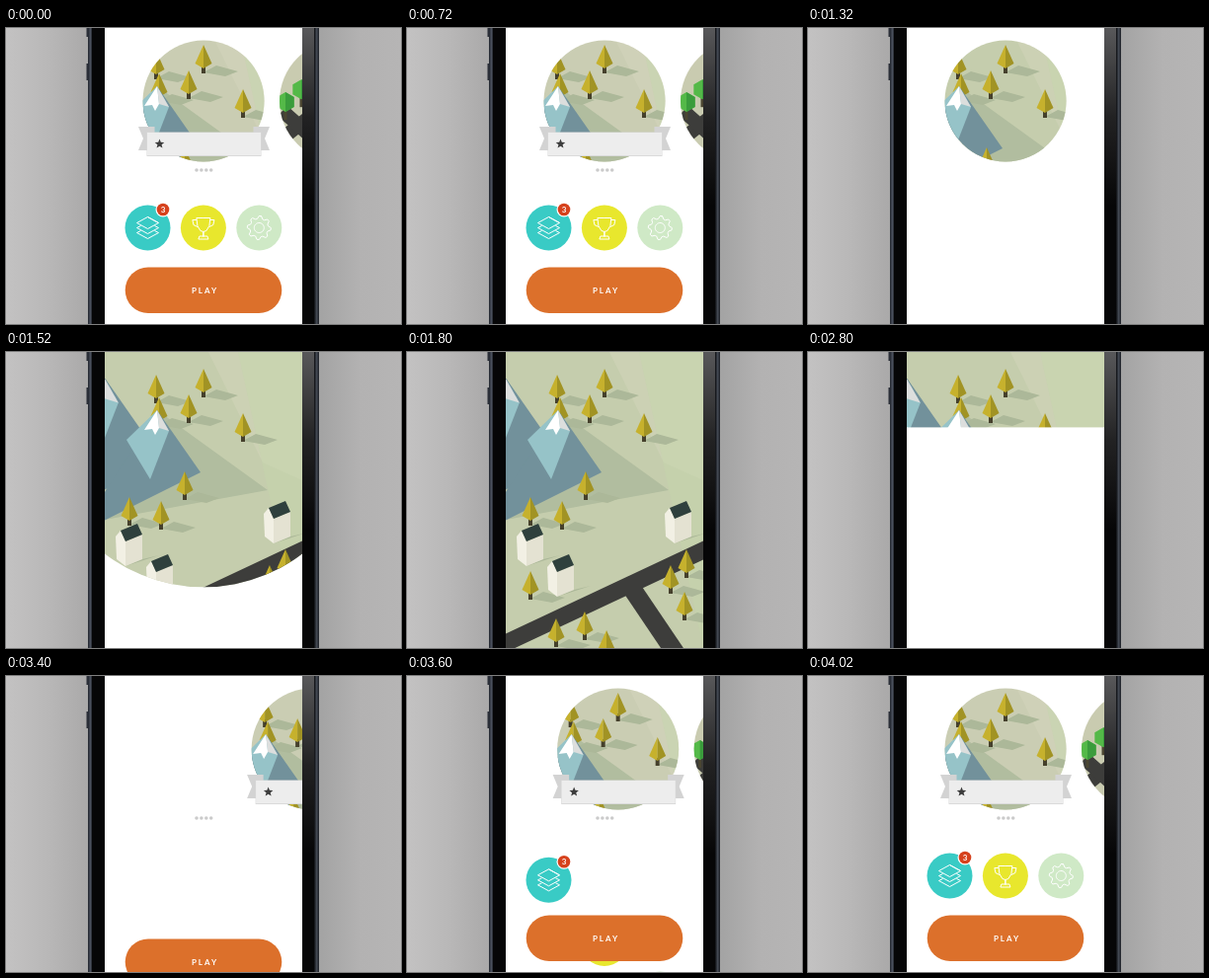
An HTML page with a canvas for the animation above (4240 ms loop, 400 by 300 pixels).

```html
<!DOCTYPE html>
<html lang="en">
<head>
<meta charset="utf-8">
<title>Map menu</title>
<style>
html, body { margin: 0; width: 100%; height: 100%; overflow: hidden; background: #b4b4b4; }
canvas { display: block; width: 400px; height: 300px; }
</style>
</head>
<body>
<canvas id="stage"></canvas>
<script>
const LOOP = 4240;
const canvas = document.getElementById('stage');
const ratio = window.devicePixelRatio || 1;
canvas.width = 400 * ratio;
canvas.height = 300 * ratio;
const c = canvas.getContext('2d');
c.scale(ratio, ratio);

const progress = (t, start, length) => Math.min(1, Math.max(0, (t - start) / length));
const outCubic = u => 1 - (1 - u) ** 3;
const outQuad = u => 1 - (1 - u) ** 2;
const inOutSine = u => (1 - Math.cos(Math.PI * u)) / 2;

function rect(color, x, y, w, h) {
  c.fillStyle = color;
  c.fillRect(x, y, w, h);
}

function poly(color, ...points) {
  c.beginPath();
  points.forEach(p => c.lineTo(...p));
  c.fillStyle = color;
  c.fill();
}

function line(...points) {
  c.beginPath();
  points.forEach(p => c.lineTo(...p));
  c.stroke();
}

function outline(points) {
  line(...points, points[0], points[1]);
}

// Points around the centre; radius(i) gives the shape.
function ring(count, radius, turn = -Math.PI / 2) {
  return Array.from({ length: count }, (_, i) => {
    const a = i * 2 * Math.PI / count + turn;
    return [radius(i) * Math.cos(a), radius(i) * Math.sin(a)];
  });
}

function disc(color, x, y, r) {
  c.beginPath();
  c.arc(x, y, r, 0, 7);
  c.fillStyle = color;
  c.fill();
}

function at(x, y, draw, sx = 1, sy = sx) {
  c.save();
  c.translate(x, y);
  c.scale(sx, sy);
  draw();
  c.restore();
}

function bothSides(draw) {
  draw();
  at(0, 0, draw, -1, 1);
}

function inCircle(x, y, r, draw) {
  c.save();
  c.beginPath();
  c.arc(x, y, r, 0, 7);
  c.clip();
  draw();
  c.restore();
}

function label(text, x, y) {
  c.fillStyle = '#fff';
  c.font = 'bold 8px Lato, sans-serif';
  c.textAlign = 'center';
  c.fillText(text, x, y);
}

function gradient(x0, y0, x1, y1, ...colors) {
  const g = c.createLinearGradient(x0, y0, x1, y1);
  colors.forEach((color, i) => g.addColorStop(i / (colors.length - 1), color));
  return g;
}

// Scenery
const SHADE = '#acb899';

function tree() {
  rect('#45402c', -2, 21, 4, 8);
  poly('#c6b12d', [0, 0], [-8.5, 19], [0, 24]);
  poly('#a19324', [0, 0], [8.5, 19], [0, 24]);
}

function treeShadow() {
  poly(SHADE, [0, 28], [13, 21], [35, 27], [22, 32]);
}

function house() {
  const eave = [10, 18], ridge = [5, 7], foot = [10, 43];
  const back = ([x, y]) => [x + 17, y - 7];
  poly(SHADE, foot, back(foot), [44, 32]);
  poly('#f2f0e4', [0, 13], ridge, eave, foot, [1, 36]);
  poly('#e4e2d2', eave, back(eave), back(foot), foot);
  poly('#2f403d', ridge, back(ridge), back(eave), eave);
}

function mountain() {
  poly('#72919b', [0, 0], [44, 63], [-80, 125]);
  poly('#96c3c8', [0, 0], [-31, 30], [-7, 70], [12, 21]);
  poly('#fff', [0, 0], [-13, 20], [-5, 19], [-2, 25], [2, 18]);
  poly('#dcdedd', [0, 0], [2, 18], [12, 21]);
}

function road(width, ...points) {
  c.strokeStyle = '#3d3d3b';
  c.lineWidth = width;
  line(...points);
}

const behind = [[152, 23], [200, 17], [155, 46], [185, 43], [240, 62]];
const front = [
  [181, 121], [125, 147], [157, 151], [283, 200], [267, 216],
  [125, 222], [281, 243], [180, 263], [151, 270], [202, 282]
];
const houses = [[261, 151], [111, 174], [142, 205]];
const place = (spots, draw) => spots.forEach(([x, y]) => at(x, y, draw));

function drawMap(ground) {
  rect(ground, 100, 0, 200, 300);
  poly('#d6d6c060', [205, 0], [300, 0], [300, 130], [260, 112]);
  poly('#c4d5aa70', [235, 0], [300, 0], [300, 300]);
  poly('#b1bd9f', [153, 59], [265, 140], [100, 170]);
  place([...behind, ...front], treeShadow);
  road(17, [80, 304.4], [320, 191.6]);
  road(19, [228, 240], [282, 320]);
  place(behind, tree);
  at(97, 22, mountain, 1.4);
  at(153, 59, mountain);
  place(houses, house);
  place(front, tree);
}

function drawNextPreview() {
  rect('#c9cbb0', 276, 12, 124, 124);
  road(14, [272, 118], [310, 88]);
  road(14, [280, 84], [320, 120]);
  for (const x of [283, 299]) {
    at(x, 75 - (x - 283) * 0.8, () => {
      rect('#4b4632', -1.5, 8, 3, 10);
      const [top, , right, bottom] = ring(6, () => 10);
      poly('#54b948', ...ring(6, () => 10));
      poly('#3a9c3c', top, [right[0], top[1] / 2], right, bottom);
    });
  }
}

// Menu
function ribbon() {
  at(200.5, 106, () => {
    bothSides(() => {
      poly('#d3d3d3', [50, -6], [66.5, -6], [61.5, 6], [66.5, 18], [50, 18]);
      poly('#aaa', [57.5, 18], [50, 18], [50, 24]);
    });
    rect('#dadada', -58, -0.5, 116, 24.5);
    rect('#ededed', -57.5, 0, 115, 23);
  });
  at(155.5, 117.5, () => poly('#3c3c3c', ...ring(10, i => i % 2 ? 2.2 : 5)));
}

function carousel(dx) {
  at(dx, 0, () => {
    inCircle(200, 74, 61.5, () => drawMap('#cacdb3'));
    inCircle(338.5, 74, 61.5, drawNextPreview);
    ribbon();
  });
}

function layersIcon() {
  outline([[0, -11], [11, -5], [0, 1], [-11, -5]]);
  for (const y of [0, 5]) line([-7, y - 2], [-11, y], [0, y + 6], [11, y], [7, y - 2]);
}

function trophyIcon() {
  bothSides(() => {
    line([0, -10], [7, -10], [6, -2], [3, 3], [0, 4], [0, 9]);
    line([7, -8], [11, -8], [10, -3], [6, -1]);
    line([0, 8.5], [4, 8.5], [5, 11.5], [0, 11.5]);
  });
}

function gearIcon() {
  outline(ring(32, i => i % 4 < 2 ? 12 : 9.3));
  outline(ring(32, () => 5));
}

const buttons = [['#39cbc5', layersIcon], ['#e8e72d', trophyIcon], ['#cfe9c6', gearIcon]];

function roundButton(i, dy) {
  const [color, icon] = buttons[i];
  at(143.5 + i * 56.4, 202.5 + dy, () => {
    disc(color, 0, 0, 23);
    c.strokeStyle = '#fff';
    c.lineWidth = 1;
    c.lineJoin = 'round';
    icon();
    if (icon !== layersIcon) return;
    disc('#fff', 15.5, -18.5, 7.5);
    disc('#d6421d', 15.5, -18.5, 6.3);
    label('3', 15.5, -15.5);
  });
}

function playButton(dy) {
  at(0, dy, () => {
    c.beginPath();
    c.roundRect(120.7, 242.5, 158.6, 46.5, 23.25);
    c.fillStyle = '#dc702b';
    c.fill();
    c.letterSpacing = '2px';
    label('PLAY', 201.5, 268.7);
    c.letterSpacing = '0px';
  });
}

function drawMenu(t) {
  const left = (start, length) => 1 - outCubic(progress(t, start, length));
  carousel(180 * left(3330, 470));
  for (let i = 0; i < 4; i++) disc('#cbcbcb', 193 + i * 4.9, 144, 1.8);
  for (let i = 2; i >= 0; i--) roundButton(i, 120 * left(3400 + i * 150, 300));
  playButton(60 * left(3330, 270));
}

function drawPhone() {
  rect(gradient(0, 0, 83, 0, '#c3c2c2', '#b9b8b8', '#aaa9a9'), 0, 0, 83, 300);
  rect(gradient(317, 0, 400, 0, '#a3a3a3', '#b3b2b2', '#b6b5b5'), 317, 0, 83, 300);
  for (const y of [-8, 36]) rect('#2b2f38', 81.5, y, 3, 17);
  rect(gradient(83, 0, 88, 0, '#20242c', '#4a505d', '#0c0d10'), 83, 0, 5, 300);
  rect('#060607', 87, 0, 226, 300);
  rect(gradient(0, 0, 0, 180, '#58585a', '#222223', '#060607'), 300, 0, 13, 300);
  rect(gradient(312, 0, 317, 0, '#0c0d10', '#424852', '#1d2027'), 312, 0, 5, 300);
}

function drawScreen(t) {
  rect('#fff', 100, 0, 200, 300);
  if (t < 1320) drawMenu(LOOP);
  else if (t < 2980) {
    const r = 61.5 + 316 * inOutSine(progress(t, 1320, 520));
    inCircle(200, 74, r, () => drawMap('#c5cdad'));
    const edge = 300 * (1 - outQuad(progress(t, 2640, 325)));
    rect('#fff', 100, edge, 200, 300 - edge);
  } else if (t >= 3340) drawMenu(t);
}

const begin = performance.now();
function frame() {
  drawPhone();
  c.save();
  c.beginPath();
  c.rect(100, 0, 200, 300);
  c.clip();
  drawScreen((performance.now() - begin) % LOOP);
  c.restore();
  requestAnimationFrame(frame);
}
frame();
</script>
</body>
</html>
```
